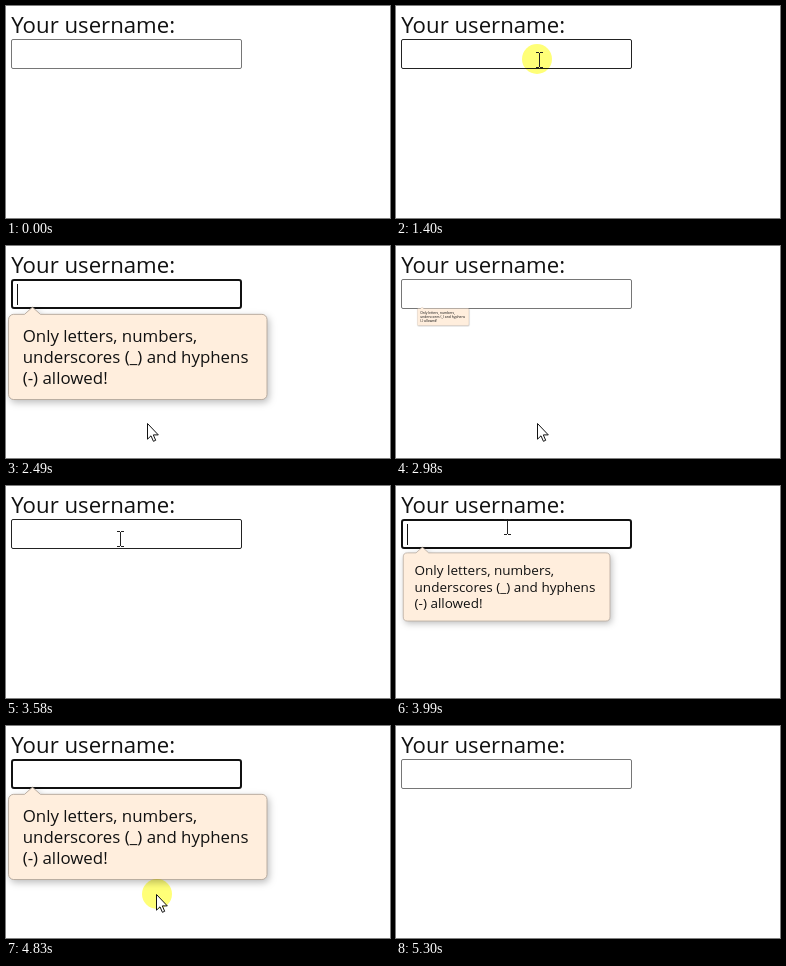
An HTML page for the animation above (6.04 s loop, 384 px wide and 212 px high).

```html
<!DOCTYPE html>
<html lang="en">
<head>
<meta charset="utf-8">
<title>Username callout</title>
<style>
  html, body { margin: 0; width: 100%; height: 100%; overflow: hidden; background: #fff; }
  svg { display: block; width: 100vw; height: 100vh; }
  text { font-family: "Open Sans", "Noto Sans", sans-serif; fill: #111; }
  #callout path { fill: #fed; stroke: #b5a89c; filter: drop-shadow(2px 3.5px 4px rgba(0, 0, 0, .25)); }
  #callout text { font-size: 18.15px; }
  #spot { fill: #ffff78; mix-blend-mode: multiply; }
</style>
</head>
<body>
<svg viewBox="0 0 384 212">
  <text x="5.3" y="27" font-size="22.2">Your username:</text>
  <rect id="field" fill="#fff"/>
  <path id="caret" d="M11.5 38V59" stroke="#111"/>
  <!-- drawn around the arrow tip, which is the scaling origin -->
  <g id="callout">
    <path d="M.5 .2L9 7.9H247.2a5.5 5.5 0 0 1 5.5 5.5V94a5.5 5.5 0 0 1-5.5 5.5H-19.7a5.5 5.5 0 0 1-5.5-5.5V13.4a5.5 5.5 0 0 1 5.5-5.5H-8Z"/>
    <text x="-10" y="37.5">Only letters, numbers,</text>
    <text x="-10" y="60">underscores (_) and hyphens</text>
    <text x="-10" y="82.5">(-) allowed!</text>
  </g>
  <g id="pointer">
    <circle id="spot" r="15"/>
    <path id="arrow" d="M-.5 .5V16.2L3 12.8 5.4 18.3 7.7 17.3 5.3 11.9H10.3Z" fill="#fff" stroke="#111"/>
    <path id="beam" d="M-1 -6.5h3M3 -6.5h3M2.5 -6V8M-1 8.5h3M3 8.5h3" fill="none" stroke="#222"/>
  </g>
</svg>
<script>
const LOOP = 6040, STEP = 68, LAG = 28, REST = 0.93;
const bursts = [0, 520, 1400, 2010, 2690, 3310, 3850, 4480, 4830, 5300];
const clicks = [1400, 2690, 3850, 4830];
const track = [ // time, x, y of the pointer
  [520, 271, 196], [1064, 141, 53], [1980, 141, 53], [2420, 142, 177],
  [3280, 142, 177], [3650, 109, 40], [4000, 109, 40], [4258, 109, 56],
  [4410, 131, 135], [4550, 151, 168], [4900, 151, 168], [5240, 335, 214]
];
const $ = id => document.getElementById(id);
const show = (id, on) => $(id).setAttribute('visibility', on ? 'visible' : 'hidden');
const set = (id, attrs) => {
  for (const name in attrs) $(id).setAttribute(name, attrs[name]);
};

function bezier(x1, y1, x2, y2) {
  const curve = (a, b, u) => 3 * (1 - u) ** 2 * u * a + 3 * (1 - u) * u * u * b + u ** 3;
  return x => {
    if (x <= 0) return 0;
    if (x >= 1) return 1;
    let lo = 0, hi = 1;
    for (let i = 0; i < 24; i++) {
      const mid = (lo + hi) / 2;
      if (curve(x1, x2, mid) < x) lo = mid; else hi = mid;
    }
    return curve(y1, y2, lo);
  };
}
const spring = bezier(.175, .885, .32, 1.29);
const ease = bezier(.25, .1, .25, 1);

function snap(t) {
  const start = bursts.filter(b => b <= t).pop();
  return start + Math.floor((t - start + 14) / STEP) * STEP;
}

function pointerAt(t) {
  const next = track.findIndex(k => k[0] > t);
  if (next < 1) return track[next ? track.length - 1 : 0].slice(1);
  const [t0, x0, y0] = track[next - 1], [t1, x1, y1] = track[next];
  const u = (t - t0) / (t1 - t0), s = u * u * (3 - 2 * u);
  return [x0 + (x1 - x0) * s, y0 + (y1 - y0) * s];
}

function draw(time) {
  const t = snap(time);
  const [x, y] = pointerAt(t).map(Math.round);
  const present = t >= 520 && t < 5240;
  const hover = present && x > 5 && x < 236 && y > 33 && y < 63;

  // Odd clicks focus the field, even ones leave it.
  const past = clicks.filter(c => c + LAG <= t);
  const focused = past.length % 2 === 1;
  const since = past.length ? t - past[past.length - 1] - LAG : Infinity;
  const scale = REST * (focused ? spring(since / 485) : 1 - ease(since / 490));

  set('field', focused
    ? { x: 6, y: 34, width: 229, height: 28, rx: 2, stroke: '#111', 'stroke-width': 2 }
    : { x: 5.5, y: 33.5, width: 230, height: 29, rx: 1.5, stroke: hover ? '#222' : '#767676', 'stroke-width': 1 });
  show('caret', focused && since % 1000 < 500);
  set('callout', { transform: `translate(26 61) scale(${Math.max(scale, .001)})` });
  show('callout', scale > .01);

  set('pointer', { transform: `translate(${x} ${y})` });
  show('spot', present && clicks.some(c => t >= c && t < c + 130));
  show('arrow', present && !hover);
  show('beam', hover);
}

function tick() {
  draw(performance.now() % LOOP);
  requestAnimationFrame(tick);
}
tick();
</script>
</body>
</html>
```
